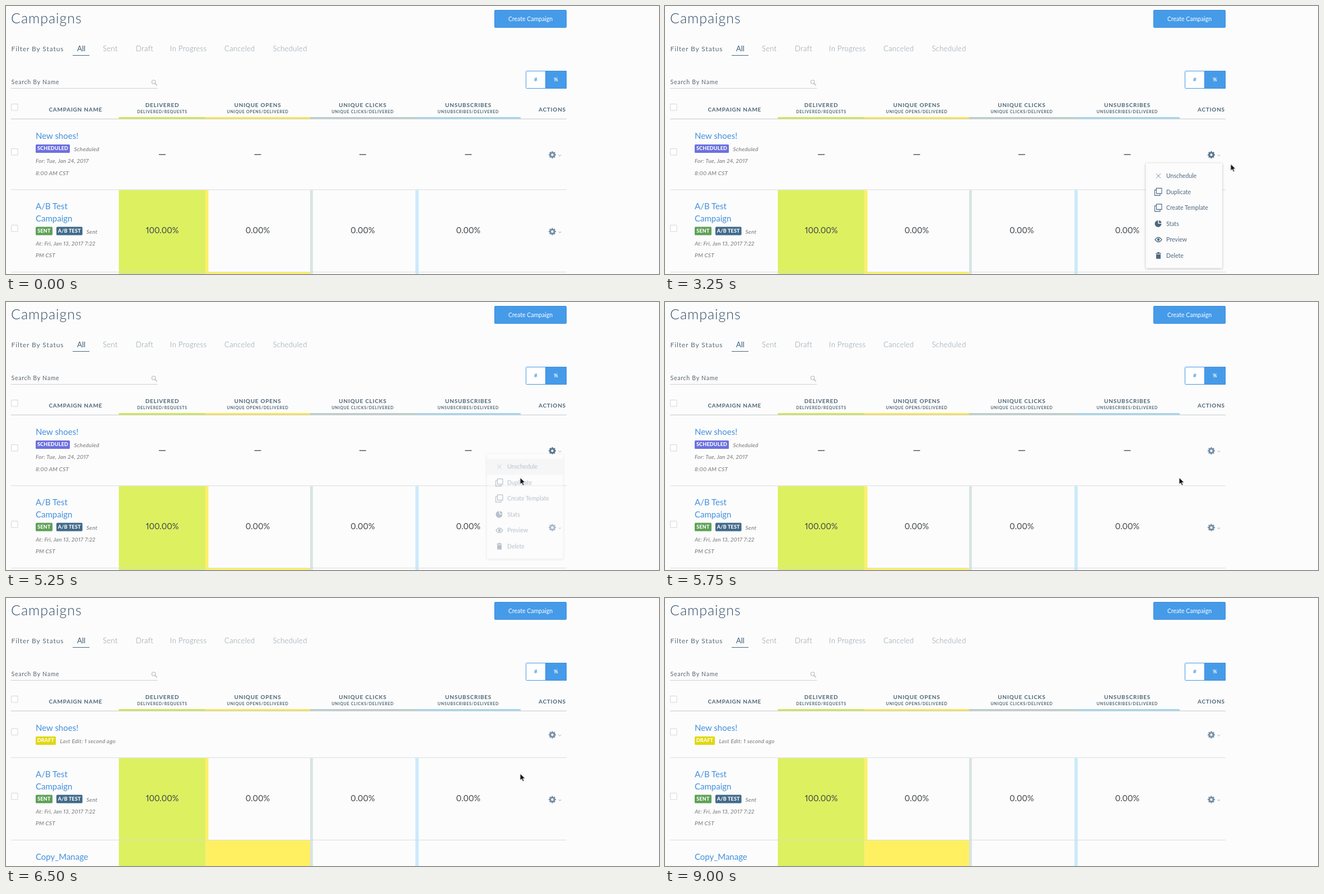
These frames come from a looping animation (1166 px wide and 480 px high, 9500 ms). An HTML page:

```html
<!DOCTYPE html>
<html lang="en">
<head>
<meta charset="utf-8">
<title>Campaigns</title>
<style>
  html, body { margin: 0; width: 100%; height: 100%; overflow: hidden; background: #fcfcfc; }
  svg { display: block; width: 1166px; height: 480px; }
  text { font-family: Lato, "Open Sans", sans-serif; font-variant-numeric: proportional-nums; fill: #4d6575; white-space: pre; }
  .mid { text-anchor: middle; }
  .title { font-size: 25px; font-weight: 300; letter-spacing: 1px; fill: #2f4d68; }
  .label { font-size: 12px; letter-spacing: .9px; fill: #566b78; }
  .tab { font-size: 13px; font-weight: 300; letter-spacing: .35px; fill: #84959f; }
  .tab.on { font-weight: 400; letter-spacing: 0; fill: #3c5c76; }
  .search { font-size: 10.5px; letter-spacing: .75px; fill: #56656e; }
  .button { font-size: 10.5px; fill: #fff; }
  .toggle { font-size: 9px; font-weight: 700; fill: #4499e8; }
  .head { font-size: 10px; font-weight: 700; letter-spacing: .75px; }
  .sub { font-size: 7px; font-weight: 700; letter-spacing: .75px; }
  .link { font-size: 15px; fill: #4290dd; }
  .badge { font-size: 9px; font-weight: 800; letter-spacing: .2px; fill: #fff; }
  .meta { font-size: 10px; font-weight: 500; font-style: italic; letter-spacing: .25px; fill: #7f7f7f; }
  .value { font-size: 14.5px; fill: #3f4448; }
  .item { font-size: 10.5px; fill: #4e6881; }
  #panel { filter: drop-shadow(0 1px 2px rgba(0, 0, 0, .25)); }
</style>
</head>
<body>
<svg id="stage" viewBox="0 0 1166 480"></svg>
<script>
const LOOP = 9500;
const COLUMNS = [
  { x: 201.5, mid: 279, bar: '#cfe846', name: 'DELIVERED', sub: 'DELIVERED/REQUESTS' },
  { x: 356.5, mid: 449.5, bar: '#fde740', name: 'UNIQUE OPENS', sub: 'UNIQUE OPENS/DELIVERED' },
  { x: 543, mid: 637, bar: '#b9cccb', name: 'UNIQUE CLICKS', sub: 'UNIQUE CLICKS/DELIVERED' },
  { x: 735, mid: 825.5, bar: '#a0d5f1', name: 'UNSUBSCRIBES', sub: 'UNSUBSCRIBES/DELIVERED' }
];

const text = (style, x, y, words) => `<text class="${style}" x="${x}" y="${y}">${words}</text>`;
const rect = (x, y, w, h, fill, more = '') =>
  `<rect x="${x}" y="${y}" width="${w}" height="${h}" fill="${fill}" ${more}/>`;
const line = (d, color, width = 1) =>
  `<path d="${d}" fill="none" stroke="${color}" stroke-width="${width}"/>`;
const group = (id, ...parts) => `<g id="${id}">${parts.join('')}</g>`;

const checkbox = y => rect(9.5, y, 11.5, 11.5, '#fff', 'stroke="#d5d5d5" rx=".5"');
const rule = y => rect(9, y, 992, 1, '#d9dbdb');
const badge = (x, y, w, fill, words) =>
  rect(x, y, w, 15, fill, 'rx="1.5"') + text('badge mid', x + w / 2, y + 10.4, words);

const gear = (y, id) => `
  <g id="${id}" fill="none" stroke="#768da5" transform="translate(975.5 ${y})">
    <circle r="3.7" stroke-width="3"/>
    <circle r="5.4" stroke-width="2.3" pathLength="16" stroke-dasharray="1" transform="rotate(-11.25)"/>
  </g>` + line(`M986.5 ${y} l2.3 2.3 2.3 -2.3`, '#8c9cab');

const copyIcon = y =>
  line(`M877.5 ${y - 6.5}h9.5v9.5h-9.5zM877.5 ${y - 3.5}h-3v10h9.5v-3`, '#4e6881', 1.1);
const icons = [
  y => line(`M877 ${y - 4}l8 8m0 -8l-8 8`, '#71869b'),
  copyIcon,
  copyIcon,
  y => `<path d="M880.5 ${y}V${y - 6}A6 6 0 1 0 886.5 ${y}Z M882 ${y - 1.3}V${y - 6}A5 5 0 0 1 886.5 ${y - 1.3}Z" fill="#4e6881"/>`,
  y => line(`M875 ${y}q6 -8 12 0q-6 8 -12 0z`, '#4e6881', 1.3) +
       `<circle cx="881" cy="${y}" r="2.2" fill="#4e6881"/>`,
  y => `<path d="M876 ${y - 4.6}h3v-1.4h4v1.4h3v1.4h-10zM877 ${y - 2.4}h8v8.2h-8z" fill="#4e6881"/>`
];
const menuItems = ['Unschedule', 'Duplicate', 'Create Template', 'Stats', 'Preview', 'Delete'];

const tabs = [[127, 'All'], [173, 'Sent'], [232, 'Draft'], [293, 'In Progress'], [390, 'Canceled'], [476.5, 'Scheduled']];

const header = [
  text('title', 9, 31, 'Campaigns'),
  rect(872.5, 7.5, 128, 31, '#469be9', 'stroke="#3a8bd9" rx="1"'),
  text('button mid', 936.5, 27, 'Create Campaign'),
  text('label', 9.5, 81, 'Filter By Status'),
  ...tabs.map(([x, name], i) => text(i ? 'tab' : 'tab on', x, 81, name)),
  rect(119, 88, 30, 1, '#44687f'),
  text('search', 9.5, 140, 'Search By Name'),
  rect(9, 147, 262, 1, '#cfcfcf'),
  '<circle cx="263.6" cy="136" r="3.4" fill="none" stroke="#a5adb3"/>',
  line('M266 138.5l3.8 3.8', '#a5adb3', 1.2),
  rect(928.5, 116.5, 72, 31, '#fff', 'stroke="#4499e8" rx="1"'),
  rect(963.5, 116.5, 37, 31, '#469be9', 'stroke="#3a8bd9"'),
  text('toggle mid', 946, 135.3, '#'),
  `<text class="toggle mid" x="982" y="135.3" style="fill:#fff">%</text>`,
  checkbox(175.5),
  text('head', 76.5, 188.5, 'CAMPAIGN NAME'),
  ...COLUMNS.map(c => text('head mid', c.mid, 181, c.name) + text('sub mid', c.mid, 192, c.sub)),
  text('head', 951, 188.5, 'ACTIONS'),
  ...COLUMNS.map((c, i) => rect(c.x, 199, (COLUMNS[i + 1]?.x ?? 919) - c.x, 3, c.bar)),
  rect(9, 201.7, 992, 1.2, '#cdd0d0'),
  text('link', 53, 238, 'New shoes!')
];

const scheduled = group('scheduled',
  badge(53, 248, 61, '#6c70df', 'SCHEDULED'),
  text('meta', 121.5, 259.5, 'Scheduled'),
  text('meta', 53, 281, 'For: Tue, Jan 24, 2017'),
  text('meta', 53, 302.5, '8:00 AM CST'),
  ...COLUMNS.map(c => rect(c.mid - 6, 265.4, 12, 1.4, '#4a4f53')));

const draft = group('draft',
  badge(53, 248, 36, '#e1d80f', 'DRAFT'),
  text('meta', 96.5, 259.5, 'Last Edit: 1 second ago'));

const controls = group('controls', checkbox(255.5), gear(266.5, 'gear'));

const rows = group('rows',
  rect(201.5, 329.5, 155, 220, '#dcf060'),
  rect(356.5, 329.5, 5, 148, '#fff062'),
  rect(356.5, 477, 186.5, 70, '#fff062'),
  rect(543, 329.5, 5, 220, '#d8e4e3'),
  rect(731, 329.5, 6, 220, '#cdeafb'),
  rule(328.5),
  rule(476),
  checkbox(392.5),
  text('link', 53, 364, 'A/B Test'),
  text('link', 53, 385.5, 'Campaign'),
  badge(53, 395.5, 30, '#5fa158', 'SENT'),
  badge(90, 395.5, 46.5, '#416a8a', 'A/B TEST'),
  text('meta', 143.5, 407.5, 'Sent'),
  text('meta', 53, 428.5, 'At: Fri, Jan 13, 2017 7:22'),
  text('meta', 53, 450, 'PM CST'),
  ...COLUMNS.map((c, i) => text('value mid', c.mid, 407, i ? '0.00%' : '100.00%')),
  gear(404, 'gear2'),
  text('link', 53, 512, 'Copy_Manage'),
  text('link', 53, 533.5, 'Emails'));

const menu = group('menu',
  rect(858.5, 281.5, 136.5, 188, '#fcfcfc', 'id="panel" rx="1"'),
  rect(859, 290.5, 135.5, 28, '#eee', 'id="hover"'),
  ...menuItems.map((name, i) => {
    const y = 304.3 + 28.55 * i;
    return icons[i](y) + text('item', 895, y + 3.7, name);
  }));

const cursor = group('cursor',
  '<path d="M.6 .6V12.6L3.4 10 5.4 14.4 7.5 13.5 5.6 9.2H9.4Z" fill="#111" stroke="#fff" stroke-width=".8"/>');

document.getElementById('stage').innerHTML =
  [...header, rows, scheduled, draft, controls, menu, cursor].join('');

// Each step holds its value until the next one begins.
function play(id, steps, toFrame) {
  const frames = steps.map(([time, ...values]) =>
    ({ offset: time / LOOP, easing: 'steps(1, end)', ...toFrame(...values) }));
  frames.push({ ...frames[frames.length - 1], offset: 1 });
  document.getElementById(id).animate(frames, { duration: LOOP, iterations: Infinity });
}
const move = (x, y) => ({ transform: `translate(${x}px, ${y}px)` });
const fade = opacity => ({ opacity });

play('cursor', [
  [0, 1200, 0], [500, 1133, 116], [750, 1102, 298], [1250, 1056, 329], [1500, 965, 300],
  [1750, 978, 275], [2000, 981, 273.5], [3250, 1009.5, 282.5], [3500, 971, 318.5],
  [3750, 917.5, 307.5], [4000, 917.5, 306], [4500, 917.5, 310.5], [4750, 917.5, 314],
  [8500, 1012, 296], [8750, 1000, -13], [9000, 1200, 0]
], move);
play('menu', [[0, 0, -10], [2750, .85, -1], [3000, 1, 0], [5250, .4, -9.5], [5500, 0, -10]],
  (opacity, y) => ({ opacity, ...move(0, y) }));
play('hover', [[0, 0], [3500, 1], [5500, 0]], fade);
play('gear', [[0, '#768da5'], [2750, '#587390'], [5500, '#768da5']], stroke => ({ stroke }));
play('scheduled', [[0, 1], [6000, 0]], fade);
play('draft', [[0, 0], [6000, 1]], fade);
play('controls', [[0, 0, 0], [6000, 0, -21.5]], move);
play('rows', [[0, 0, 0], [6000, 0, -43]], move);
</script>
</body>
</html>
```
